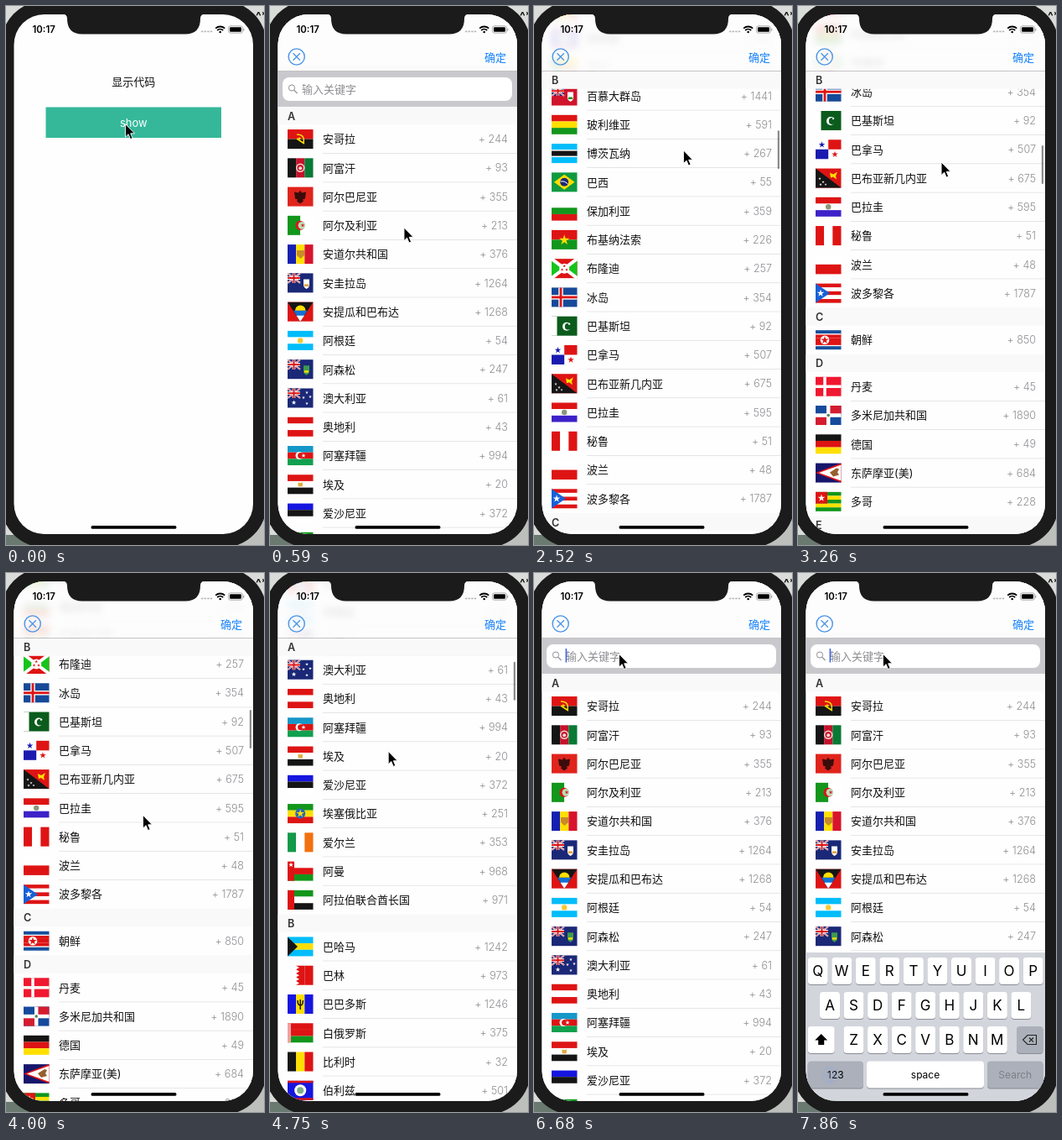
An HTML page for the animation above (8000 ms loop, 308 by 642 pixels).

```html
<!DOCTYPE html>
<html lang="zh-CN">
<meta charset="utf-8">
<style>
  html, body { margin: 0; height: 100%; overflow: hidden; }
  svg { display: block; width: 308px; height: 642px; font-family: Inter, 'Noto Sans CJK SC', 'Noto Sans CJK', sans-serif; }
</style>
<body>
<script type="module">
const LOOP = 8000, NAV = 77.5, SEARCH = 42.6, HEAD = 21.3, ROW = 34.27;
const R = '#de1414', G = '#12961c', B = '#1616e0', Y = '#ffdf00', W = '#fff', K = '#151515', N = '#1b2877', C = '#00bdfa', BLUE = '#1583fb';

// Drawing helpers
const rect = (x, y, w, h, fill, more = '') => `<rect x="${x}" y="${y}" width="${w}" height="${h}" fill="${fill}" ${more}/>`;
const dot = (x, y, r, fill, more = '') => `<circle cx="${x}" cy="${y}" r="${r}" fill="${fill}" ${more}/>`;
const path = (d, fill, more = '') => `<path d="${d}" fill="${fill}" ${more}/>`;
const line = (d, color, width = 1) => path(d, 'none', `stroke="${color}" stroke-width="${width}"`);
const text = (x, y, s, size, fill, more = '') => `<text x="${x}" y="${y + size * .37}" font-size="${size}" fill="${fill}" ${more}>${s}</text>`;
const group = (id, content) => `<g id="${id}">${content}</g>`;
const MID = 'text-anchor="middle"';

// Flag parts, in a 30.5 x 23 box
const H = (...c) => c.map((f, i) => rect(0, i * 23 / c.length, 30.5, 23 / c.length, f)).join('');
const V = (...c) => c.map((f, i) => rect(i * 30.5 / c.length, 0, 30.5 / c.length, 23, f)).join('');
const star = (x, y, r, fill) => path('M' + [0, 1, 2, 3, 4].map(i => {
  const a = i * Math.PI * .8;
  return (x + r * Math.sin(a)).toFixed(1) + ' ' + (y - r * Math.cos(a)).toFixed(1);
}).join('L') + 'Z', fill);
const moon = (x, y, r, fill, back) => dot(x, y, r, fill) + dot(x + r * .35, y, r * .78, back);
const cross = (x, w, fill) => rect(x - w / 2, 0, w, 23, fill) + rect(0, 11.5 - w / 2, 30.5, w, fill);
const hoist = (fill, x = 12) => path(`M0 0L${x} 11.5 0 23Z`, fill);
const ensign = back => H(back) + rect(0, 0, 15, 11.5, N) + line('M0 0L15 11.5M15 0L0 11.5', W, 2) +
  line('M0 0L15 11.5M15 0L0 11.5', R, .7) + line('M7.5 0V11.5M0 5.7H15', W, 3.6) + line('M7.5 0V11.5M0 5.7H15', R, 2);
const shield = (upper, lower) => path('M19 7h7v6q0 4-3.5 5.5q-3.5-1.5-3.5-5.5z', upper) + rect(20, 13, 5, 2.5, lower);

const sections = [
  ['A', [
    ['安哥拉', 244, H(R, K) + path('M11 6q10 0 8 10l-8-5 9 6', 'none', `stroke="${Y}" stroke-width="1.5"`) + star(14, 11, 2.5, Y)],
    ['阿富汗', 93, V(K, '#c3142c', '#087a36') + dot(15.2, 11.5, 4.5, 'none', 'stroke="#f3d6d2" stroke-width="1.5"') + dot(15.2, 12, 2, '#f3d6d2')],
    ['阿尔巴尼亚', 355, H('#e0241c') + path('M15 4l2 3 5-1-1 8-3 1 1 2-4 3-4-3 1-2-3-1-1-8 5 1z', '#3a0c0a')],
    ['阿尔及利亚', 213, V(G, W) + moon(15, 11.5, 5.5, R, '#b9e0bb') + star(18, 11.5, 2.5, R)],
    ['安道尔共和国', 376, V('#1620b0', Y, '#d8142c') + path('M11 7h9v6l-4.5 4-4.5-4z', '#c98a2a')],
    ['安圭拉岛', 1264, ensign(N) + shield(W, '#e6a03a')],
    ['安提瓜和巴布达', 1268, H(R) + path('M0 0H30.5L15.2 23Z', K) + path('M7 10H23.5L15.2 23Z', '#1272d8') + path('M10.5 16H20L15.2 23Z', W) + path('M9 10a6 6 0 0 1 12.5 0z', Y)],
    ['阿根廷', 54, H(C, W, C) + dot(15.2, 11.5, 3.2, '#f6c92e')],
    ['阿森松', 247, ensign(N) + shield('#3e9a4c', Y)],
    ['澳大利亚', 61, ensign(N) + star(7.5, 17, 3, W) + star(23, 5, 2, W) + star(19, 11, 2, W) + star(27, 10, 2, W) + star(23, 18, 2, W)],
    ['奥地利', 43, H(R, W, R)],
    ['阿塞拜疆', 994, H('#1597c8', R, '#10a04e') + moon(14, 11.5, 4.5, W, R) + star(19, 11.5, 2.7, W)],
    ['埃及', 20, H(R, W, K) + path('M12.5 9l2.7 1 2.7-1v5h-5.4z', '#dcae3c')],
    ['爱沙尼亚', 372, H(B, K, W)],
    ['埃塞俄比亚', 251, H(G, Y, R) + dot(15.2, 11.5, 6, '#2867b8') + star(15.2, 11.5, 5, Y)],
    ['爱尔兰', 353, V('#129a48', W, '#f2700f')],
    ['阿曼', 968, H(W, R, G) + rect(0, 0, 8, 23, R) + star(4, 4, 3, W)],
    ['阿拉伯联合酋长国', 971, H(G, W, K) + rect(0, 0, 8, 23, R)]]],
  ['B', [
    ['巴哈马', 1242, H(C, Y, C) + hoist(K)],
    ['巴林', 973, V(W, R, R) + path('M10 0l4 2.3-4 2.3 4 2.3-4 2.3 4 2.3-4 2.3 4 2.3-4 2.3 4 2.3-4 2.3z', W)],
    ['巴巴多斯', 1246, V(B, Y, B) + line('M15.2 6V18M12 7q0 6 3.2 6t3.2-6', K, 1.5)],
    ['白俄罗斯', 375, H(R, R, G) + rect(0, 0, 4, 23, '#f0a0a0')],
    ['比利时', 32, V(K, Y, R)],
    ['伯利兹', 501, H(B) + rect(0, 0, 30.5, 2.5, R) + rect(0, 20.5, 30.5, 2.5, R) + dot(15.2, 11.5, 7, W) + dot(15.2, 11.5, 4, '#7eae8a')],
    ['贝宁', 229, H(Y, R) + rect(0, 0, 12, 23, G)],
    ['百慕大群岛', 1441, ensign('#d0142c') + shield(W, G)],
    ['玻利维亚', 591, H(R, Y, G)],
    ['博茨瓦纳', 267, H(C) + rect(0, 7, 30.5, 9, W) + rect(0, 8.5, 30.5, 6, K)],
    ['巴西', 55, H('#109a40') + path('M15.2 2.5L27.5 11.5 15.2 20.5 3 11.5Z', Y) + dot(15.2, 11.5, 5, N) + line('M10.5 10.5q5-1 9 3', W)],
    ['保加利亚', 359, H(W, G, R)],
    ['布基纳法索', 226, H(R, G) + star(15.2, 11.8, 6.5, Y)],
    ['布隆迪', 257, H(R) + path('M0 0L15.2 11.5 0 23ZM30.5 0L15.2 11.5 30.5 23Z', '#16c41c') + line('M0 0L30.5 23M30.5 0L0 23', W, 4) + dot(15.2, 11.5, 6, W) + star(15.2, 8.5, 2, R) + star(12.5, 13, 2, R) + star(18, 13, 2, R)],
    ['冰岛', 354, H('#164a98') + cross(11, 5.5, W) + cross(11, 2.8, R)],
    ['巴基斯坦', 92, H('#0b5c1c') + rect(0, 0, 6.5, 23, W) + moon(18, 12, 5, W, '#0b5c1c') + star(21, 9, 2, W)],
    ['巴拿马', 507, H(W) + rect(15.2, 0, 15.3, 11.5, R) + rect(0, 11.5, 15.2, 11.5, '#1a1ab0') + star(7.5, 6, 4, '#1a1ab0') + star(23, 17.5, 4, R)],
    ['巴布亚新几内亚', 675, H(R) + path('M0 0V23H30.5Z', K) + path('M17 5l4 2 5-3-2 5 1 4-4-3-3 1z', Y) + star(5, 12, 1.7, W) + star(9, 16, 1.7, W) + star(6, 19, 1.7, W) + star(12, 19, 1.5, W)],
    ['巴拉圭', 595, H(R, W, '#3c22c8') + dot(15.2, 11.5, 3.2, '#8a9a78')],
    ['秘鲁', 51, V(R, W, R)],
    ['波兰', 48, H(W, R)],
    ['波多黎各', 1787, H(R, W, R, W, R) + hoist('#1760d8', 17) + star(6, 11.5, 4.5, W)]]],
  ['C', [
    ['朝鲜', 850, H('#164f9c', R, R, R, '#164f9c') + rect(0, 4, 30.5, 1.3, W) + rect(0, 17.7, 30.5, 1.3, W) + dot(11, 11.5, 5.3, W) + star(11, 11.7, 5, R)]]],
  ['D', [
    ['丹麦', 45, H('#f01830') + cross(11, 3.5, W)],
    ['多米尼加共和国', 1890, H('#164a9c') + rect(15, 0, 15.5, 11.5, '#d41c30') + rect(0, 11.5, 15, 11.5, '#d41c30') + cross(15.2, 4.5, W) + dot(15.2, 11.5, 1.8, '#5a8060')],
    ['德国', 49, H(K, R, Y)],
    ['东萨摩亚(美)', 684, H('#16166c') + path('M30.5 0L0 11.5 30.5 23Z', R) + path('M30.5 2L4 11.5 30.5 21Z', W) + path('M17 11l8-5 3 1-2 4 2 3-7 2z', '#96602c')],
    ['多哥', 228, H(G, Y, G, Y, G) + rect(0, 0, 14, 13.8, R) + star(7, 7.2, 4.5, W)]]],
  ['E', [
    ['厄瓜多尔', 593, H(Y, Y, B, R) + dot(15.2, 11.5, 4, '#8a6a3a')],
    ['俄罗斯', 7, H(W, B, R)]]]
];

// List content, measured from the lower edge of the navigation bar
let offset = SEARCH, rows = '', heads = '';
const spans = sections.map(([letter, items]) => {
  const start = offset, id = 'head' + letter;
  offset += HEAD;
  items.forEach(([name, code, flag], i) => {
    const mid = offset + ROW / 2;
    rows += `<g transform="translate(21 ${mid - 11.5})">${flag}</g>` + text(63, mid, name, 13, '#111') +
      text(284, mid, '+ ' + code, 12.6, '#8e8e93', 'text-anchor="end" font-weight="300"');
    offset += ROW;
    if (i < items.length - 1) rows += rect(63, offset - .4, 232, .7, '#dcdce0');
  });
  heads += group(id, rect(9, 0, 287, HEAD, '#f9f9f9') + text(21, 11, letter, 12.6, '#333', 'font-weight="600"'));
  return { id, start, end: offset };
});
const searchBar = rect(9, 0, 287, SEARCH, '#c9c9cd') + rect(15, 7.5, 274, 28, W, 'rx="8"') +
  dot(26, 20, 3.6, 'none', 'stroke="#8e8e93"') + line('M28.7 22.7L32.5 26.5', '#8e8e93', 1.2) +
  text(38, 21.5, '输入关键字', 13, '#8e8e93') + rect(37.6, 12.5, 1.6, 16.5, '#3d63e6', 'id="caret"');

// Keyboard
const key = (x, y, w, fill, label = '', size = 17, color = '#000') => rect(x, y - 15, w, 32, '#898c92', 'rx="4"') +
  rect(x, y - 16, w, 32, fill, 'rx="4"') + text(x + w / 2, y, label, size, color, MID);
const keyRow = (letters, x, y) => [...letters].map((c, i) => key(x + i * 28.55, y, 24, W, c)).join('');
const GREY = '#abb0ba';
const keyboard = rect(9, 452, 287, 190, '#d2d5db') +
  keyRow('QWERTYUIOP', 11.7, 474) + keyRow('ASDFGHJKL', 26, 515) + keyRow('ZXCVBNM', 54.5, 556) +
  key(11.7, 556, 32, W) + path('M27.7 549l7.5 7.5h-4v5.5h-7v-5.5h-4z', '#000') +
  key(261, 556, 31.5, GREY) + line('M274 550.5h10.5v11H274l-5.5-5.5zM276 553.5l5 5m0-5l-5 5', '#222', 1.1) +
  key(11.7, 597.5, 66.3, GREY, '123', 12) + key(82, 597.5, 140, W, 'space', 12) + key(226, 597.5, 66.5, GREY, 'Search', 12, '#7d8188') +
  `<g opacity=".45">${dot(38.5, 598, 9.5, 'none', 'stroke="#8ea6ea"')}${line('M29 598H48M38.5 588.5V607.5M38.5 588.5q-9 9.5 0 19q9-9.5 0-19', '#8ea6ea', .9)}</g>`;

const navBar = rect(9, 9, 287, NAV - 9, '#fdfdfd') +
  '<g clip-path="url(#navClip)"><use href="#list" filter="url(#blur)" opacity=".14"/></g>' + rect(9, NAV - .4, 287, .8, '#b8b8bb') +
  dot(31.7, 60.5, 9.6, 'none', 'stroke="#4a94e6" stroke-width="1.4"') + line('M27.5 56.3l8.4 8.4m0-8.4l-8.4 8.4', '#4a94e6', 1.3) +
  text(256, 61, '确定', 13, BLUE);
const home = rect(9, 9, 287, 622, '#fefefe') + text(152.3, 90, '显示代码', 13, '#111', MID) +
  rect(47.5, 120.5, 209.5, 36.5, '#35b89a') + text(152.3, 139, 'show', 13, W, MID);
const statusBar = text(31.5, 28, '10:17', 11.4, '#000', 'font-weight="600"') +
  [0, 1, 2, 3].map(i => rect(233 + i * 3.6, 29.6, 2.4, 1.6, '#b5b5b5')).join('') +
  line('M250.2 26.7a8 8 0 0 1 11 0M252.2 29a5 5 0 0 1 7 0', '#000', 1.8) + dot(255.7, 31, 1.3, '#000') +
  rect(265.5, 23.8, 17, 8.4, 'none', 'rx="2.4" stroke="#999" stroke-width=".8"') + rect(267, 25.2, 14, 5.6, '#000', 'rx="1.2"') + rect(283.3, 26.7, 1, 2.8, '#999');

document.body.innerHTML = `<svg viewBox="0 0 308 642">
<defs>
  <clipPath id="screen">${rect(9.5, 10, 285.5, 619, W, 'rx="36"')}</clipPath>
  <clipPath id="navClip">${rect(9, 9, 287, NAV - 9, W)}</clipPath>
  <filter id="blur"><feGaussianBlur stdDeviation="5"/></filter>
</defs>` +
  rect(0, 0, 308, 642, '#dadcda') + rect(0, 630, 30, 12, '#6b7a70') + rect(270, 600, 38, 42, '#bdbfbd') +
  text(298, 12, '^*', 14, '#111', 'font-weight="700"') +
  rect(-6, -6, 317, 651, '#1b1b1b', 'rx="52"') +
  '<g clip-path="url(#screen)">' + home +
  group('modal', rect(9, 9, 287, 640, '#fefefe') + group('list', searchBar + rows + heads) + navBar + rect(290.8, 80, 2.2, 46, '#000', 'id="thumb" rx="1.1"')) +
  group('keyboard', keyboard) + statusBar + rect(101.5, 619, 102, 3.8, '#000', 'rx="1.9"') + '</g>' +
  path('M68 9.5Q73 10 73 15Q73 33.5 91 33.5H214Q232 33.5 232 15Q232 10 237 9.5Z', '#1b1b1b') +
  group('pointer', path('M0 0V15.5L3.6 12.2 6 18 8.6 17 6.2 11.3H11Z', '#000', 'stroke="#fff" stroke-width=".9"')) + '</svg>';

// Motion: the screen refreshes in runs of [first, last, count] with holds between them
const runs = [[0, 0, 1], [150, 590, 4], [1190, 2220, 8], [2370, 3400, 8], [3550, 4450, 7], [4600, 5640, 8], [5790, 5940, 2], [6540, 6680, 2], [7280, 7860, 5]];
const scrollTrack = [[1040, 0], [1484, 109], [1780, 480], [2070, 760], [2517, 929.5], [3000, 1130], [3400, 1200], [3700, 1195], [4000, 1133.7], [4300, 900], [4750, 350], [5050, 40], [5200, -20], [5343, -8.5], [5640, 0]];
const pointerX = [[150, 142.5], [590, 160], [1484, 163.5], [2517, 178.5], [4000, 163.5], [5343, 123.5], [5790, 101.5]];
const pointerY = [[150, 140.5], [590, 264], [1190, 228], [1484, 156], [1930, 250], [2517, 172], [3100, 165], [4000, 288.5], [4450, 190], [5050, 235], [5343, 231], [5790, 96.5]];

const clamp = (v, lo = 0, hi = 1) => Math.max(lo, Math.min(hi, v));
const easeOut = x => 1 - (1 - clamp(x)) ** 3;
function snap(t) {
  const [first, last, count] = runs.findLast(r => r[0] <= t);
  const step = (last - first) / (count - 1) || 1;
  return first + step * Math.min(count - 1, Math.floor((t - first) / step + .06));
}
function track(points, t) {
  const i = points.findIndex(p => p[0] > t);
  if (i < 1) return points.at(i)[1];
  const [[t0, v0], [t1, v1]] = points.slice(i - 1, i + 1);
  return v0 + (v1 - v0) * (t - t0) / (t1 - t0);
}
const $ = id => document.getElementById(id);
const move = (id, x, y) => $(id).setAttribute('transform', `translate(${x} ${y})`);

function draw(now) {
  const t = snap(now % LOOP), scroll = track(scrollTrack, t);
  move('modal', 0, 630 * (1 - easeOut((t - 100) / 490)));
  move('list', 0, NAV - scroll);
  for (const { id, start, end } of spans) move(id, 0, Math.max(start, Math.min(scroll, end - HEAD)));
  $('thumb').setAttribute('y', 80 + Math.max(0, scroll) * .0733);
  $('thumb').setAttribute('height', 46 + Math.min(0, scroll));
  $('thumb').setAttribute('opacity', t < 1190 ? 0 : .45 * clamp((5940 - t) / 300));
  $('caret').setAttribute('opacity', t < 6540 ? 0 : t < 6680 ? .5 : 1);
  move('keyboard', 0, 190 * (1 - easeOut((t - 7200) / 480)));
  move('pointer', track(pointerX, t), track(pointerY, t));
  requestAnimationFrame(draw);
}
draw(performance.now());
</script>
</body>
</html>
```
